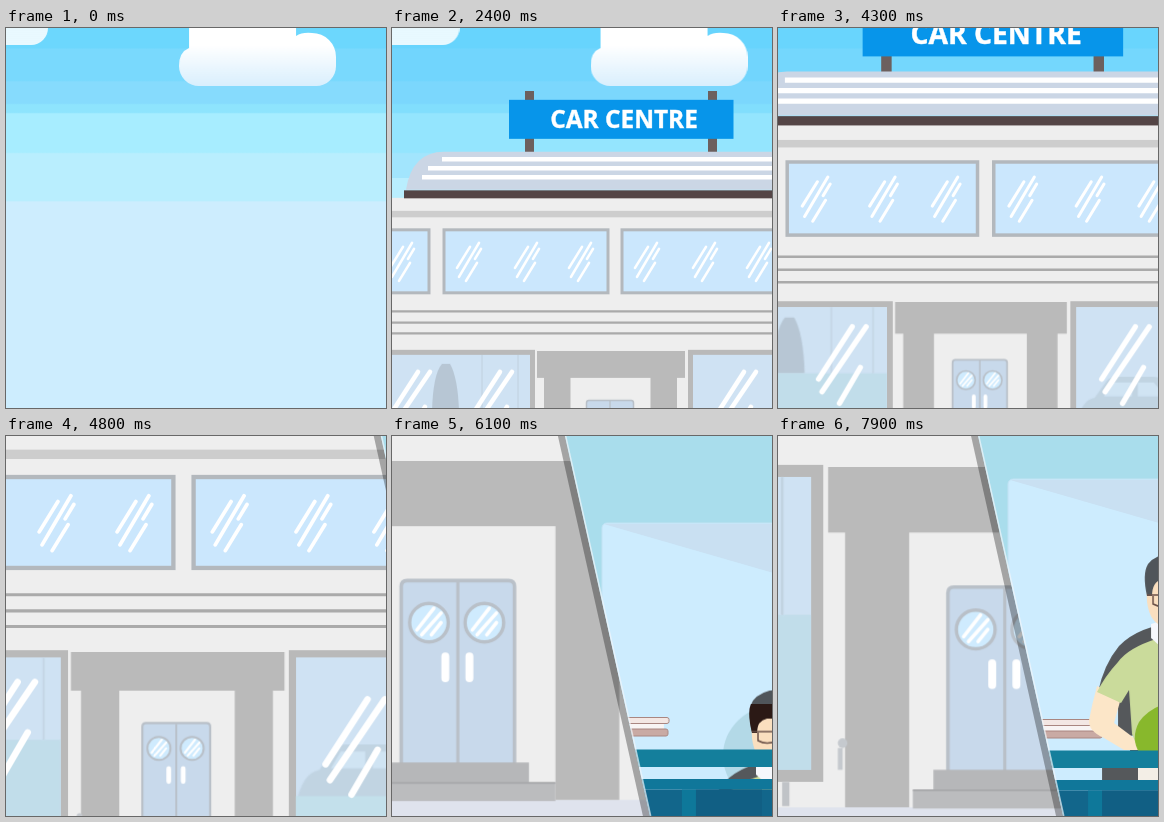
Recreate the animation shown at these times as an HTML page. Size 380 by 380 pixels, loop 8000 ms.

```html
<!DOCTYPE html>
<html lang="en">
<head>
<meta charset="utf-8">
<title>Car centre</title>
<style>
@property --edge { syntax: '<length>'; inherits: true; initial-value: 400px; }

html, body { margin: 0; width: 100%; height: 100%; overflow: hidden; background: #cdedfe; }
svg { position: absolute; left: 0; top: 0; width: 100%; height: 100%; }
body { animation: edge 8s linear infinite; }
#sky, #clouds, #haze, #zoom, #rise, #shine, .room, #panel, #books, #desk, #smear, #man, .early {
  animation: 8s linear infinite;
}
#sky { animation-name: sky; }
#clouds { animation-name: drift; }
#haze { animation-name: haze; }
#zoom { animation-name: zoom; }
#rise { animation-name: rise; }
#shine { animation-name: shine; }
.room { animation-name: room; }
#panel { animation-name: panel; }
#books { animation-name: books; }
#desk { animation-name: focus; }
#smear { animation-name: smear; }
#man { animation-name: stand; }
.early { animation-name: early; }
#office { clip-path: polygon(calc(var(--edge) + 6px) 0, 1000px 0, 1000px 380px, calc(var(--edge) + 91px) 380px); }
#seam, #rim { transform: translateX(var(--edge)); }

@keyframes drift { from { transform: none; } to { transform: translateX(85px); } }
@keyframes sky {
  0%, 37.5% { transform: none; animation-timing-function: ease-in; }
  43.75% { transform: translateY(-2px); animation-timing-function: ease-in; }
  53.75%, 100% { transform: translateY(-60px); }
}
@keyframes haze { 0%, 22% { opacity: 0; } 42%, 45% { opacity: .6; } 53.75%, 100% { opacity: .15; } }
@keyframes rise {
  0%, 9.375% { transform: translateY(338px); animation-timing-function: cubic-bezier(.333, 1, .667, 1); }
  43.125%, 100% { transform: none; }
}
@keyframes shine { 0%, 53.75% { transform: none; } 66.25%, 100% { transform: translate(-3px, 24px); } }
@keyframes zoom {
  0%, 43.75% { transform: translate(0, 0) scale(1); animation-timing-function: cubic-bezier(.333, 0, .667, .333); }
  53.75% { transform: translate(-51px, -77px) scale(1.16); animation-timing-function: cubic-bezier(.333, .208, .667, .635); }
  66.25% { transform: translate(-262px, -404px) scale(1.8); animation-timing-function: cubic-bezier(.333, .306, .667, .781); }
  76.25% { transform: translate(-459.5px, -705px) scale(2.41); animation-timing-function: cubic-bezier(.333, .667, .667, 1); }
  78.75%, 90.625% { transform: translate(-473px, -730px) scale(2.46); animation-timing-function: cubic-bezier(.4, .1, .7, .8); }
  98.75% { transform: translate(-301px, -702px) scale(2.42); }
  100% { transform: translate(-281px, -699px) scale(2.415); }
}
@keyframes edge {
  0%, 56.25% { --edge: 400px; animation-timing-function: cubic-bezier(.333, .14, .667, .63); }
  66.25% { --edge: 289px; animation-timing-function: cubic-bezier(.333, .34, .667, .825); }
  76.25% { --edge: 167px; animation-timing-function: cubic-bezier(.333, .76, .667, 1); }
  78.75%, 90.625% { --edge: 160px; animation-timing-function: cubic-bezier(.4, .1, .7, .8); }
  98.75% { --edge: 194px; }
  100% { --edge: 198px; }
}
@keyframes room {
  0%, 56.25% { transform: translate(230px, -76px); animation-timing-function: cubic-bezier(.333, .14, .667, .63); }
  66.25% { transform: translate(120px, -38px); animation-timing-function: cubic-bezier(.333, .34, .667, .825); }
  76.25% { transform: translate(0, 0); animation-timing-function: cubic-bezier(.333, .76, .667, 1); }
  78.75%, 90.625% { transform: translate(-6px, 0); animation-timing-function: cubic-bezier(.4, .1, .7, .8); }
  98.75% { transform: translate(20px, 1px); }
  100% { transform: translate(23px, 1px); }
}
@keyframes panel {
  0%, 76.25% { transform: none; animation-timing-function: ease-in-out; }
  90.625% { transform: translateY(-31px); }
  98.75%, 100% { transform: translateY(-45px); }
}
@keyframes books {
  0%, 67% { opacity: 0; transform: none; }
  73%, 78.75% { opacity: 1; transform: none; }
  98.75%, 100% { opacity: 1; transform: translate(28px, 1px); }
}
@keyframes focus { 0%, 66.25% { filter: blur(5px); } 74%, 100% { filter: blur(0); } }
@keyframes smear { 0%, 66.25% { opacity: 1; } 73%, 100% { opacity: 0; } }
@keyframes stand {
  0%, 71.25% { transform: translate(10px, 260px); animation-timing-function: ease-in; }
  76.25% { transform: translate(-9px, 137px); animation-timing-function: cubic-bezier(.3, .6, .6, 1); }
  85%, 90.625% { transform: translate(-25px, 0); animation-timing-function: cubic-bezier(.4, .1, .7, .8); }
  98.75% { transform: translate(0, 0); }
  100% { transform: translate(3px, 0); }
}
@keyframes early { 0%, 77% { opacity: 1; } 84%, 100% { opacity: 0; } }
</style>
</head>
<body>
<svg viewBox="0 0 380 380">
  <defs>
    <linearGradient id="air" x2="0" y2="1">
      <stop offset="0" stop-color="#6cd7fd"/><stop offset=".052" stop-color="#6cd7fd"/>
      <stop offset=".056" stop-color="#79d9fd"/><stop offset=".138" stop-color="#79d9fd"/>
      <stop offset=".142" stop-color="#86dbfd"/><stop offset=".198" stop-color="#86dbfd"/>
      <stop offset=".202" stop-color="#8ee4fd"/><stop offset=".222" stop-color="#8ee4fd"/>
      <stop offset=".226" stop-color="#a7edff"/><stop offset=".327" stop-color="#a7edff"/>
      <stop offset=".331" stop-color="#b9eefe"/><stop offset=".454" stop-color="#b9eefe"/>
      <stop offset=".458" stop-color="#cdedfe"/>
    </linearGradient>
    <linearGradient id="puff" gradientUnits="userSpaceOnUse" x1="0" y1="0" x2="0" y2="58">
      <stop offset=".3" stop-color="#fff"/><stop offset="1" stop-color="#d9effd"/>
    </linearGradient>
    <g id="glare" fill="none" stroke="#fff" stroke-linecap="round">
      <path d="M1 27 14 6M3 36 23 2M10 40 21 22M19 18 25 8"/>
    </g>
    <g id="pane">
      <rect x="52" y="182" width="164" height="63" fill="#cbe7fd" stroke="#b3b8bd" stroke-width="3"/>
      <g stroke-width="2.600">
        <use href="#glare" x="64" y="193"/><use href="#glare" x="122" y="193"/><use href="#glare" x="176" y="193"/>
      </g>
    </g>
    <g id="bigGlare" fill="none" stroke="#fff" stroke-width="4.600" stroke-linecap="round">
      <path d="M79 369 108 324M82 380 120 324M97 390 115 359"/>
    </g>
    <g id="car">
      <path d="M0 44Q4 22 16 20L26 6Q29 2 36 2H66Q74 2 80 9L92 21Q106 25 108 44V64H0Z" fill="#bccfdd"/>
      <path d="M24 19 31 7H48V19ZM53 7H67L77 19H53Z" fill="#d0e4f3"/>
      <path d="M0 38H108V64H0Z" fill="#bfdfe9"/>
    </g>
    <g id="porthole">
      <circle r="8" fill="#cfebfe" stroke="#b9c0c8" stroke-width="1.400"/>
      <path d="M-5 3 2-6M-3 5 5-4M1 5 5 0" stroke="#fff" stroke-width="1.500" stroke-linecap="round"/>
    </g>
  </defs>

  <rect width="380" height="380" fill="url(#air)"/>
  <rect id="haze" width="380" height="150" fill="#57cafa"/>
  <g id="sky">
    <g id="clouds" fill="url(#puff)">
      <path d="M183 20V-40H290V8Q296 4 306 5A24 24 0 0 1 330 29V38A20 20 0 0 1 310 58H193A20 20 0 0 1 173 38Q173 24 183 20Z"/>
      <path d="M-90-30H42V0A17 17 0 0 1 25 17H-90Z" opacity=".85"/>
    </g>
  </g>

  <g id="zoom"><g id="rise">
    <path d="M133 43h9v64h-9zM316 43h9v64h-9z" fill="#6c605e"/>
    <rect x="117" y="52" width="224.500" height="39" fill="#0795ea"/>
    <text x="232" y="80.300" text-anchor="middle" fill="#fff" stroke="#fff" stroke-width=".4" font-family="'Open Sans', 'Noto Sans', sans-serif" font-weight="700" font-size="24.400">CAR CENTRE</text>

    <path d="M14 142Q20 104 52 104H620V142Z" fill="#cbd6e5"/>
    <path d="M50 111.500H620M36 120.500H620M30 129.500H620" stroke="#fff" stroke-width="4.500"/>
    <rect x="-150" y="150" width="800" height="300" fill="#eee"/>
    <rect x="12" y="142.500" width="640" height="8" fill="#544546"/>
    <rect x="-150" y="163" width="800" height="6.500" fill="#cdcdcd"/>
    <use href="#pane" x="-179"/><use href="#pane"/><use href="#pane" x="178"/>
    <path d="M-150 263.600H650M-150 274.800H650M-150 285.600H650" stroke="#aaa" stroke-width="2.200"/>

    <g fill="#cfe2f3" stroke="#b9b9b9" stroke-width="5">
      <rect x="-120" y="304.500" width="260.500" height="126"/>
      <rect x="298.500" y="304.500" width="220" height="128"/>
    </g>
    <g opacity=".75">
      <path d="M40 364Q41 326 50 316H58Q66 330 67 364Z" fill="#afbdca"/>
      <path d="M-110 364H138V428H-110Z" fill="#bddbe7"/>
      <path d="M90 307V364M126 307V364" stroke="#bccbd8"/>
      <use href="#car" x="301" y="365"/>
    </g>
    <use href="#bigGlare" x="-82"/><use href="#bigGlare"/>
    <g id="shine"><use href="#bigGlare" x="244"/></g>

    <rect x="-150" y="443.500" width="800" height="90" fill="#dfe3ed"/>
    <path d="M126 433v10h3v-10z" fill="#c0c3c7"/>
    <path d="M145 303H293V330H285V443.500H258.500V330H178.500V443.500H152V330H145Z" fill="#bababa"/>
    <path d="M150 428v-9" stroke="#c5c9ce" stroke-width="2"/><circle cx="151" cy="417" r="2" fill="#c5c9ce"/>

    <path d="M194.500 430V355Q194.500 352.500 197 352.500H239Q241.500 352.500 241.500 355V430Z" fill="#c8d9eb" stroke="#b9c0c8" stroke-width="1.500"/>
    <path d="M218 353V430" stroke="#b9c0c8" stroke-width="1.300"/>
    <use href="#porthole" x="206" y="370"/><use href="#porthole" x="229" y="370"/>
    <path d="M212.800 384v9M222.800 384v9" stroke="#fff" stroke-width="3.300" stroke-linecap="round"/>
    <rect x="188.500" y="428" width="59" height="8.500" fill="#b6b7b9"/>
    <rect x="180" y="436.500" width="78.500" height="7.500" fill="#bbbcbe"/>
    <path d="M180 436.500H258.500" stroke="#a9aaac" stroke-width=".8"/>
  </g></g>

  <polygon id="seam" points="-1,0 7,0 92,380 84,380" fill="#000" fill-opacity=".31"/>
</svg>

<svg id="office" viewBox="0 0 380 380">
  <rect width="380" height="380" fill="#a9ddec"/>
  <g class="room">
    <g id="panel">
      <rect x="210" y="87" width="400" height="420" rx="5" fill="#cdecfe" stroke="#c2e2f3"/>
      <path d="M212 88H600V200Z" fill="#c9e0f2"/>
    </g>
    <g id="books" stroke="#a98681">
      <rect x="150" y="281.500" width="127" height="6" rx="2" fill="#f3e7e4"/>
      <rect x="150" y="288" width="122" height="5" fill="#f8f4f4" stroke="none"/>
      <rect x="150" y="293" width="126" height="7" rx="2" fill="#c9aaa4"/>
    </g>
  </g>

  <g id="man">
    <ellipse class="early" cx="392" cy="183" rx="52" ry="50" fill="#b3d9e7"/>
    <path d="M400 186Q360 190 341 210 326 228 320 256L340 262V300L360 306V345H324V331H352V300L400 290Z" fill="#55585b"/>
    <path d="M319 250Q314 268 311 284 310 295 326 302L346 314H362L356 302 336 287 343 262Z" fill="#fce6c8"/>
    <path d="M378 203Q350 212 340 226 327 240 319 256L343 267 351 254 354 298 362 318H420V203Z" fill="#cadb9b"/>
    <path d="M420 262Q376 264 361 286 352 303 362 318H420Z" fill="#88b82c"/>
    <path d="M373 188V202L384 212 400 200V180Z" fill="#f6f8fc"/>
    <path d="M368 142H420V190H386Q372 188 369 166Z" fill="#fadfbf"/>
    <path d="M369 160Q364 138 370 128 378 118 394 117H420V143H384Q374 146 374 160Z" fill="#50555a"/>
    <path class="early" d="M369 160Q364 140 368 131H420V146H384Q374 148 374 160Z" fill="#2b1915"/>
    <path d="M369 159H400M375 160V168Q384 173 394 168V160" fill="none" stroke="#6b5249" stroke-width="1.500"/>
    <path d="M360 326H420V345H360Z" fill="#f3eee6"/>
  </g>

  <g class="room">
    <g id="desk">
      <rect x="-100" y="313.500" width="800" height="17.500" fill="#147f9c"/>
      <rect id="smear" x="-100" y="330" width="800" height="14" fill="#10779a"/>
      <rect x="-100" y="343" width="800" height="10.500" fill="#10779a"/>
      <rect x="-100" y="353.500" width="800" height="140" fill="#12668b"/>
      <rect x="290" y="353.500" width="14" height="140" fill="#0e789a"/>
      <rect x="304" y="353.500" width="66" height="140" fill="#115f84"/>
    </g>
  </g>

  <path id="rim" d="M6.500 0 91.500 380" stroke="#f2f6f9" stroke-opacity=".7" stroke-width="2"/>
</svg>
</body>
</html>
```
